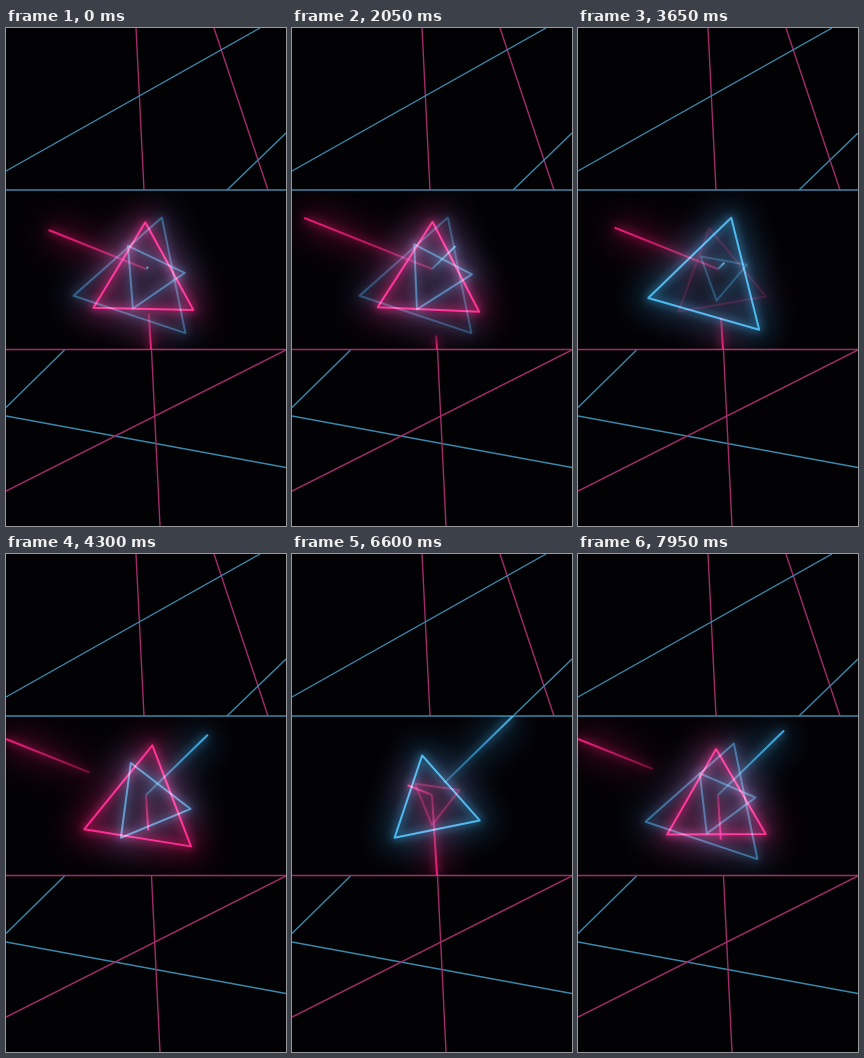
An HTML page with a canvas that plays this animation: 280 px wide and 498 px high, repeating every 8000 ms.

```html
<!DOCTYPE html>
<html lang="en">
<head>
<meta charset="utf-8">
<title>Neon prism</title>
<style>
html, body { margin: 0; width: 100%; height: 100%; overflow: hidden; background: #020104; }
canvas { display: block; width: 280px; height: 498px; }
</style>
</head>
<body>
<canvas id="stage" width="280" height="498"></canvas>
<script>
const ctx = document.getElementById('stage').getContext('2d');
const FRAME = 50, FRAMES = 160, TRI_CYCLE = 40, BEAM_CYCLE = 36;
const PINK = '255,25,112', BLUE = '58,172,245';
const DIM_PINK = '#a02c68', DIM_BLUE = '#3a88ab';
const HUB = [140, 241];

const wires = [
  [DIM_PINK, 130, 0, 138, 162], [DIM_PINK, 208, 0, 262, 162],
  [DIM_BLUE, 254, 0, 0, 143], [DIM_BLUE, 280, 105, 221, 162],
  [DIM_BLUE, 58.5, 322, 0, 379.5], [DIM_BLUE, 0, 388, 280, 439.5],
  [DIM_PINK, 280, 322, 0, 463], [DIM_PINK, 145.5, 322, 154, 498],
  [DIM_BLUE, 0, 162, 280, 162], [DIM_PINK, 0, 321.5, 280, 321.5]
];

// Both ends of a beam run outward from the hub: [first frame, frames needed]
const beams = [
  { color: PINK, end: [0, 185], head: [20, 23], tail: [44, 15] },
  { color: BLUE, end: [221, 162], head: [-.5, 19], tail: [22, 13] },
  { color: PINK, end: [145, 321], head: [10, 9], tail: [26, 18] }
];

const clamp = v => Math.min(1, Math.max(0, v));
const fade = (t, start, rise, end, fall) =>
  clamp(Math.min((t - start) / rise, (end - t) / fall));

const triangles = [
  { color: BLUE, delay: 0, alpha: t => fade(t, -16, 30, 46, 14) },
  { color: PINK, delay: 20,
    alpha: t => .55 * fade(t, -14, 9, 4, 6) + fade(t, 12, 6, 32, 5) }
];

// Rotation in degrees, slowing down to a stop
const turnAt = t => 108.5 - 53 * Math.max(0, 1 - t / 38) ** 1.5;

function trace(points, closed) {
  ctx.beginPath();
  points.forEach(p => ctx.lineTo(...p));
  if (closed) ctx.closePath();
}

function neon(style, alpha) {
  ctx.strokeStyle = style;
  for (const [blur, width, strength] of [[15, 26, .3], [4, 6, .45], [.4, 2, 1]]) {
    ctx.filter = `blur(${blur}px)`;
    ctx.lineWidth = width;
    ctx.globalAlpha = alpha * strength;
    ctx.stroke();
  }
  ctx.filter = 'none';
  ctx.globalAlpha = 1;
}

function drawTriangle({ color, alpha }, t) {
  const strength = alpha(t);
  if (!strength) return;
  const turn = turnAt(t), r = 3 + .6 * turn;
  const cx = 144 - 9.7 * (r / 68) ** 3, cy = 240.5 + .2 * r;
  trace([0, 120, 240].map(step => {
    const a = (turn - 180 + step) * Math.PI / 180;
    return [cx + r * Math.cos(a), cy + r * Math.sin(a)];
  }), true);
  neon(`rgb(${color})`, strength);
}

function drawBeam({ color, end, head, tail }, t) {
  const [to, from] = [head, tail].map(([start, length]) => clamp((t - start) / length));
  if (to <= from) return;
  const at = f => HUB.map((v, i) => v + (end[i] - v) * f);
  const a = at(from), b = at(to);
  const shade = ctx.createLinearGradient(...a, ...b);
  shade.addColorStop(0, `rgba(${color},.4)`);
  shade.addColorStop(1, `rgb(${color})`);
  trace([a, b]);
  neon(shade, .9);
}

function draw(now) {
  const n = Math.floor(now / FRAME) % FRAMES;
  ctx.globalCompositeOperation = 'source-over';
  ctx.fillStyle = '#020104';
  ctx.fillRect(0, 0, 280, 498);
  ctx.lineWidth = 1.4;
  for (const [color, x1, y1, x2, y2] of wires) {
    ctx.strokeStyle = color;
    trace([[x1, y1], [x2, y2]]);
    ctx.stroke();
  }

  ctx.save();
  ctx.beginPath();
  ctx.rect(0, 162, 280, 160);
  ctx.clip();
  ctx.globalCompositeOperation = 'screen';
  ctx.lineJoin = 'round';
  for (const triangle of triangles) {
    for (const shift of [-TRI_CYCLE, 0, TRI_CYCLE]) {
      drawTriangle(triangle, n % TRI_CYCLE - triangle.delay + shift);
    }
  }
  for (const beam of beams) {
    for (const shift of [0, BEAM_CYCLE]) drawBeam(beam, n % BEAM_CYCLE + shift);
  }
  ctx.restore();
}

const start = performance.now();
function tick() {
  draw(performance.now() - start);
  requestAnimationFrame(tick);
}
tick();
</script>
</body>
</html>
```
